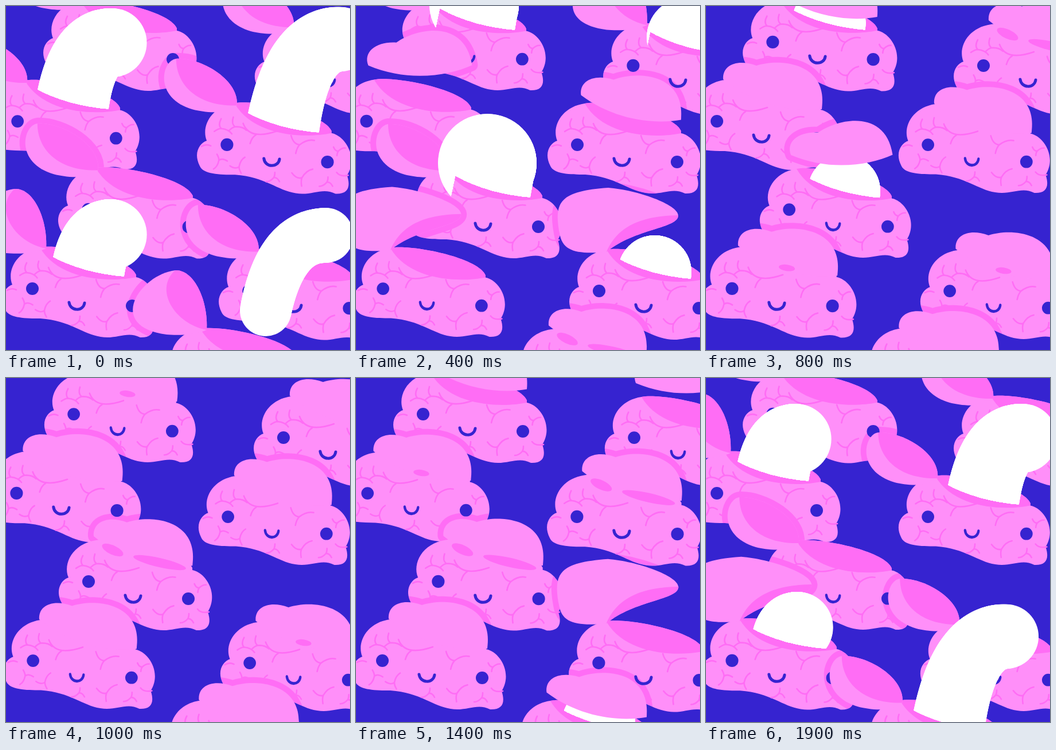
Recreate the animation shown at these times as an HTML page with a canvas. Size 600x600 px, loop 2 s.

```html
<!DOCTYPE html>
<html lang="en">
<head>
<meta charset="utf-8">
<title>Brains passing thoughts</title>
<style>
  html, body { margin: 0; height: 100%; overflow: hidden; background: #3623d0; }
  canvas { display: block; width: 100vw; height: 100vh; }
</style>
</head>
<body>
<canvas id="stage" width="600" height="600"></canvas>
<script>
const BLUE = '#3623d0', PINK = '#ff8ff9', DARK = '#ff6df5', WHITE = '#fff';
const FRAMES = 20, FRAME_MS = 100;
const ctx = document.getElementById('stage').getContext('2d');

const clamp = (v, low, high) => Math.max(low, Math.min(v, high));
const lerp = (a, b, t) => a + (b - a) * t;
const mix = (p, q, t) => [lerp(p[0], q[0], t), lerp(p[1], q[1], t)];
const path = d => new Path2D(d);

function ellipse(x, y, rx, ry, degrees = 0) {
  const shape = new Path2D();
  shape.ellipse(x, y, rx, ry, degrees * Math.PI / 180, 0, 2 * Math.PI);
  return shape;
}

// All shapes are placed relative to the middle of the smile.
const topEdge = 'M-64 -101 C-30 -108 90 -85 104 -53 L104 -49';
const body = path(`${topEdge} C127 -45 151 -8 131 24 C138 45 132 57 111 56
  C88 44 70 60 42 55 C10 50 -10 27 -63 23 C-90 23 -118 22 -124 8
  C-136 -15 -124 -32 -112 -36 C-122 -60 -105 -95 -64 -101 Z`);
const rim = path(`${topEdge} C60 -40 -30 -42 -64 -101 Z`);
const smile = path('M-13 -5 C-11 11 12 11 14 -4');
const eyes = [ellipse(-77, -29, 11, 11), ellipse(97, 1, 11, 11)];
const aboveMouth = path('M-400 -20 H-62 L-48 -88 Q10 -56 87 -50 H400 V-500 H-400 Z');

// Forehead fold and two short creases, then forked twigs: x, y, size, turn.
const veins = path(`M-49 -66 Q-38 -36 11 -53 M-27 -46 Q-34 -42 -37 -31
  M113 19 Q119 27 133 24 M-121 -26 Q-113 -31 -105 -27`);
const twig = path('M-1 -.7 Q-.6 .1 0 0 Q.6 -.7 1.3 -.7 M0 0 Q-.2 .3 -.2 .9');
for (const [x, y, size, turn] of [
  [49, -29, 18, 12], [-87, -57, 14, 55], [-63, -60, 14, 45], [116, -18, 9, 5], [53, 28, 16, -10],
  [96, 36, 10, 180], [-56, 9, 13, -30], [-91, -2, 12, 150], [4, 28, 10, 180]
]) veins.addPath(twig, new DOMMatrix().translate(x, y).rotate(turn).scale(size));

const cap = path(`M-66 -102 C-68 -128 -40 -138 -8 -126 C35 -140 118 -130 106 -50
  C60 -44 -10 -55 -66 -102 Z`);
const gaps = {
  1: [ellipse(18, -65, 14, 5.5, 8)],
  2: [ellipse(-35, -84, 20, 8, 25), ellipse(47, -62, 47, 8, 13)]
};

// A lid that is still over the head lifts, then tips back around its hinge.
function liftedLid(pose) {
  const shape = new Path2D();
  shape.addPath(cap, new DOMMatrix()
    .translate(-pose * pose / 2, -1.5 * pose * pose)
    .translate(-64, -102).rotate(-17 * (pose / 4) ** 6).translate(64, 102));
  return { shape, inside: gaps[pose] || [] };
}

// An open lid: its back runs hinge to tip, its lip tip to hinge, its seam hinge to tip.
function openLid(hinge, back, lip, seam) {
  return { shape: path(`M${hinge} ${back} ${lip} Z`), inside: [path(`M${hinge} ${seam} ${lip} Z`)] };
}

const lids = [
  ...[0, 1, 2, 3, 4].map(liftedLid),
  openLid('-64 -97', 'C-115 -93 -141 -97 -146 -130 C-156 -185 -145 -203 -61 -209 C-10 -205 60 -180 61 -161',
    'C62 -138 -15 -138 -64 -97', 'C-50 -130 -20 -160 61 -161'),
  openLid('-53 -99', 'C-80 -88 -110 -90 -123 -91 C-230 -105 -170 -195 -108 -203',
    'C-75 -205 -50 -150 -53 -99', 'C-110 -110 -145 -170 -108 -203'),
  openLid('-60 -97', 'C-80 -80 -115 -85 -136 -90 C-205 -110 -190 -175 -165 -178',
    'C-120 -180 -55 -140 -60 -97', 'C-125 -95 -165 -130 -165 -178')
];

// Each sender's receiver sits up and to its right.
const pairs = [
  { x: 96,  y: 230, delay: 2 },
  { x: 463, y: 271, delay: 1 },
  { x: 123, y: 522, delay: 3 },
  { x: 403, y: 664, delay: 0 }
];
const RECEIVER = [98, -138];

// Clock times of the handover.
const SENDER_OPENS = 11, RECEIVER_OPENS = 9;
const APPEARS = 14, FREE = 20, SUNK = 26;

function fill(shape, color) {
  ctx.fillStyle = color;
  ctx.fill(shape);
}

function stroke(shape, color, width) {
  ctx.strokeStyle = color;
  ctx.lineWidth = width;
  ctx.stroke(shape);
}

function lidPose(clock, sends) {
  const n = clock - (sends ? SENDER_OPENS : RECEIVER_OPENS);
  return clamp(Math.min(n, (sends ? 15 : 20) - n), 0, 7);
}

// A fat worm from mouth to head: it stretches out of the sender, then sinks into the receiver.
function drawThought(clock) {
  const mouth = [20, -62];
  const free = clock === FREE;
  const tail = free ? [50, -133] : mouth;
  const tailRadius = free ? 45 : 64;
  let head, headRadius;
  if (clock <= FREE) {
    const rise = clamp((clock - 15) / 5, 0, 1) ** 1.3;
    head = mix(mouth, [155, -264], rise);
    headRadius = 62 - 14 * rise ** 3;
  } else {
    const height = clamp((24 - clock) / 3, 0, 1);
    head = mix(mouth, [8, -110], height);
    headRadius = lerp(62, 86, height);
  }
  const bend = [lerp(tail[0], head[0], 0.25), head[1]];

  ctx.save();
  ctx.clip(aboveMouth);
  for (let t = 0; t <= 1; t += 1 / 64) {
    const [x, y] = mix(mix(tail, bend, t), mix(bend, head, t), t);
    const radius = lerp(tailRadius, headRadius, t);
    fill(ellipse(x, y, radius, radius), WHITE);
  }
  ctx.restore();
}

function drawBrain(x, y, clock, sends, hasThought) {
  const pose = lidPose(clock, sends);
  const lid = lids[pose];
  const drawing = (clock + (sends ? 2 : 1)) % 3;
  const scale = [1.007, 1, 0.987][drawing];

  ctx.save();
  ctx.translate(x + 10, y - 20);
  ctx.scale(scale, scale);
  ctx.translate(-10, 20);

  // The lid's shadow tints pink neighbours and leaves blue alone.
  ctx.globalCompositeOperation = 'darken';
  stroke(lid.shape, DARK, 20);
  ctx.globalCompositeOperation = 'source-over';

  fill(body, PINK);
  stroke(veins, DARK, 2.6);
  if (pose > 2) fill(rim, DARK);
  eyes.forEach(eye => fill(eye, BLUE));
  ctx.save();
  if (drawing === 2) ctx.scale(0.88, 1);
  stroke(smile, BLUE, 5);
  ctx.restore();

  if (hasThought && pose <= 4) drawThought(clock);
  fill(lid.shape, PINK);
  lid.inside.forEach(part => fill(part, DARK));
  ctx.restore();
}

function draw(now) {
  const frame = Math.floor(now / FRAME_MS) % FRAMES;
  ctx.fillStyle = BLUE;
  ctx.fillRect(0, 0, 600, 600);
  ctx.lineCap = ctx.lineJoin = 'round';

  const flying = [];
  for (const { x, y, delay } of pairs) {
    const clock = (frame - delay + FRAMES + 11) % FRAMES + RECEIVER_OPENS;
    const visible = clock >= APPEARS && clock <= SUNK;
    for (const sends of [false, true]) {
      const [dx, dy] = sends ? [0, 0] : RECEIVER;
      const hasThought = visible && (clock <= FREE) === sends;
      drawBrain(x + dx, y + dy, clock, sends, hasThought);
      if (hasThought && lidPose(clock, sends) > 4) flying.push([x + dx, y + dy, clock]);
    }
  }
  for (const [x, y, clock] of flying) {
    ctx.save();
    ctx.translate(x, y);
    drawThought(clock);
    ctx.restore();
  }
  requestAnimationFrame(() => draw(performance.now()));
}
draw(0);
</script>
</body>
</html>
```
